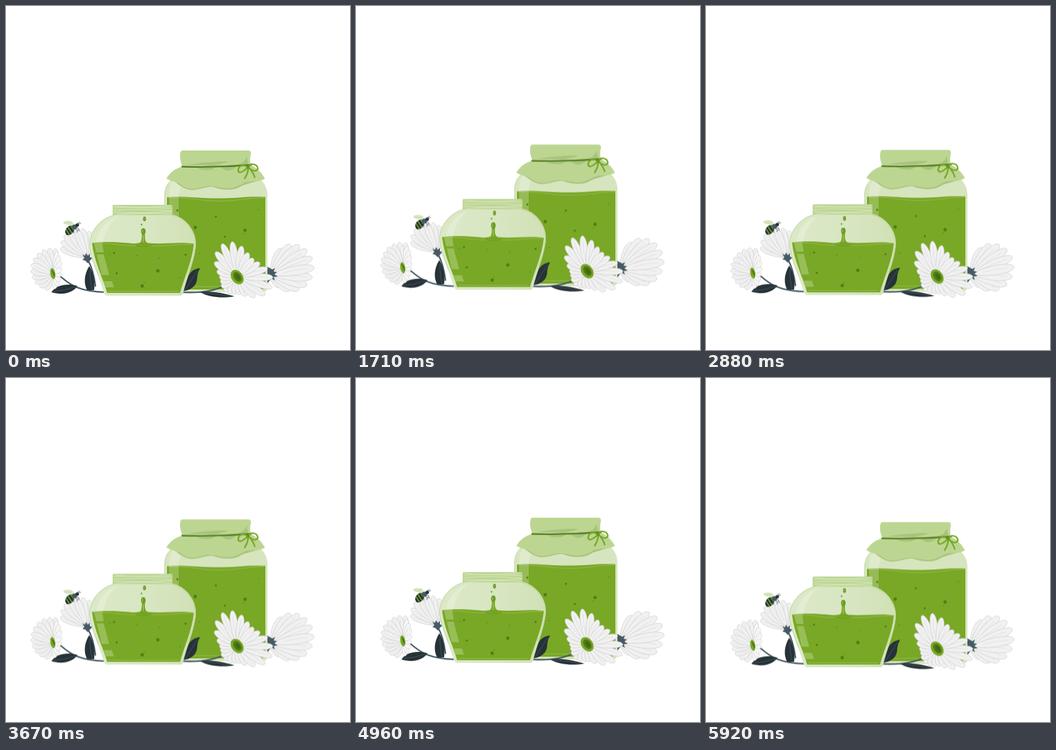
Animation, 500 px wide and 500 px high, one loop 5960 ms. Source, as an HTML page:

```html
<!DOCTYPE html>
<html lang="en">
<head>
<meta charset="utf-8">
<title>Jam jars</title>
<style>
html, body { margin: 0; width: 100%; height: 100%; overflow: hidden; background: #fff; }
svg { display: block; width: 100%; height: 100%; }
#scene { animation: float 5.96s linear infinite; }
/* a 3 s bob, cut slightly short on its second pass */
@keyframes float {
  0%, 50.336% { transform: translateY(0); }
  25.168%, 75.503% { transform: translateY(-10px); }
  100% { transform: translateY(-.267px); }
}
.glass { fill: #d7e5bf; }
.cloth { fill: #bcd692; }
.fold { fill: #a8c37d; }
.jam { fill: #78a825; }
.dark { fill: #507b17; }
.shine { fill: #fff; opacity: .22; }
.pane { fill: #a3c66a; opacity: .75; }
.leaf { fill: #263238; }
.calyx { fill: #455a64; }
.line { fill: none; stroke-linecap: round; stroke-linejoin: round; }
.stem { stroke: #455a64; stroke-width: 2.2; }
.rib { stroke: #607078; stroke-width: .5; }
.bow { stroke: #78a825; stroke-width: 2.3; }
.surface { stroke: #94bb53; }
.seed { stroke: #507b17; stroke-width: 4.8; }
.seed.small { stroke-width: 3; }
.seed.tiny { stroke-width: 1.5; }
.petal { fill: #f1f1f1; stroke: #c9c9c9; stroke-width: .6; }
.inner .petal { fill: #fafafa; }
.vein { stroke: #d6d6d6; stroke-width: .5; }
</style>
</head>
<body>
<svg viewBox="0 0 500 500">
<defs>
  <linearGradient id="sheen">
    <stop offset="0" stop-color="#dce9c8"/>
    <stop offset=".55" stop-color="#d8e6c2"/>
    <stop offset="1" stop-color="#d1e1b5"/>
  </linearGradient>
  <clipPath id="abdomen"><ellipse cx="92.500" cy="326" rx="7.800" ry="5.500" transform="rotate(-52 92.500 326)"/></clipPath>
</defs>
<g id="scene">
  <!-- large jar -->
  <path class="glass" d="M247 248H363C374 253 380 263 380 276V408Q380 416 372 416H238Q230 416 230 408V276C230 263 236 253 247 248Z"/>
  <path class="line" d="M235 259Q230.500 266 230.500 278V300" stroke="#c3d7a1" stroke-width=".8"/>
  <path class="jam" d="M234 278C252 276 275 279 300 279.500C335 280 350 276 377 277.500V405Q377 412 371 412H240Q234 412 234 405Z"/>
  <path class="line surface" d="M236 279C262 277 280 283 306 283.500C334 284 350 279 375 278.500"/>
  <path class="shine" d="M242 254Q251 253 257 259Q251 267 251 280V340H237V277Q237 262 242 254Z"/>
  <path class="line surface" d="M241 408H370"/>
  <path class="line seed" d="M275 322h0M347.500 326h0"/>
  <path class="line seed small" d="M305 306h0M318 335.300h0M249 297h0"/>
  <path class="line seed tiny" d="M345 331h0M367 296.300h0M281 359.500h0"/>

  <!-- cloth cover -->
  <path class="fold" d="M238 252C248 255 256 267 270 267.500C284 267 290 262 301 263C314 268 330 268 338 264C347 258 360 257 371 252Z"/>
  <path class="cloth" d="M257 233C247 236 239 241 233 250.500C240 256 248 254 256 261C264 267 274 267 286 263C300 259 310 265 322 265C334 265 338 261 346 257C358 253 366 257 376.500 251C371 241 363 234 355 231Z"/>
  <path class="cloth" d="M257 210H352Q356.500 210 356 215C354.500 221 354.500 226 356 232H256C253 225 252.500 219 253.500 213Q254 210 257 210Z"/>
  <path class="fold" d="M264 231C281 228 301 225.500 323 226C318 229 309 230 303 231.500ZM336 231Q347 228 350 219Q351 227 353 231ZM275 234H305Q300 239 291 238.500Q281 238 275 234ZM311 233H335Q329 240 321 239Q316 238 311 233Z"/>
  <path class="line" d="M256 233.500Q306 235 356 231" stroke="#557f20" stroke-width="2.3"/>
  <path class="line bow" d="M351 234C342 228 337 235 337.500 240C340 245 348 238 352 234C356 227 366 230 366 237C363 242 356 239 352 234M352 235Q352 243 347 250.500M353 235Q359 241 361.500 249"/>
  <circle cx="352" cy="234" r="2.4" fill="#69951f"/>

  <!-- left flowers and foliage -->
  <path class="line stem" d="M79 393C94 406 106 415 146 416M119 369Q127 383 130 407"/>
  <path class="leaf" d="M66 416C74 405 88 403 104 407C97 417 82 421 66 416ZM121 378C113 391 113 404 118 413H128C130 400 127 387 121 378Z"/>
  <path class="line rib" d="M69 415Q85 414 101 408M122 384Q122 400 125 412"/>
  <g id="back-left"></g>
  <path class="calyx" d="M111 361L115 363L116 359L119 363L122 360L122 365L126 366L122 370L119 374L115 370L111 369L114 366Z"/>
  <g id="left"></g>
  <g id="left-inner" class="inner"></g>
  <ellipse cx="68" cy="389" rx="3.600" ry="8" transform="rotate(-10 68 389)" class="jam"/>
  <path class="dark" d="M66 383Q72 386 71 394Q68 392 66 383Z"/>

  <!-- bee -->
  <path d="M98 318C93 311 86 311 83 315C87 319 94 319 98 318ZM99 317C96 311 91 312 90 314Z" fill="#d3e3b9"/>
  <g clip-path="url(#abdomen)">
    <path class="leaf" d="M82 315H104V337H82Z"/>
    <path class="line" d="M86 323L94 335M89 320L97 332M93 318L101 329" stroke="#78a825" stroke-width="1.500"/>
  </g>
  <circle class="calyx" cx="99.500" cy="321" r="3.600"/>
  <circle class="leaf" cx="103.500" cy="318.500" r="2.500"/>
  <path class="line" d="M99 324L98 330M101 324L104 326L103 329M103 322L106 324V327M104 316L107 314M105 317L108.500 316" stroke="#263238" stroke-width=".7"/>

  <!-- right flower and foliage -->
  <path class="line stem" d="M250 416C273 417 294 417 315 408"/>
  <path class="leaf" d="M282 381C267 383 263 394 261 405L256 415C274 412 278 403 278 393Q279 386 282 381ZM282 416C296 414 315 417 332 422C316 425 296 424 282 416Z"/>
  <path class="line rib" d="M260 413Q268 401 278 385M287 417Q307 418 326 422"/>
  <g id="right"></g>
  <path class="calyx" d="M380 379L387 383L391 381L389 386L394 387L390 390L395 393L389 394L391 399L386 396L380 403Z"/>

  <!-- small jar -->
  <path d="M160 303H240C262 306 277 329 276 346C275 369 262 397 258 416Q257 421 253 421H147Q144 421 142 416C137 397 122 369 121 346C121 328 137 306 160 303Z" fill="url(#sheen)"/>
  <path class="line" d="M156 304.500C137 309 122 329 121.500 346C122 362 129 377 134 391M242 304.500C261 309 275 329 275.500 346C275 360 269 376 264 389" stroke="#bdd397" stroke-width=".8"/>
  <path class="jam" d="M125 344.500C143 342 160 343 178 344.500Q188 346 195 344C198 341 197 334 198 328H202C202 336 201 342 206 344.500C230 347 250 342 273 345.500C271 371 258 397 253 417H147C141 395 128 372 125 344.500Z"/>
  <path class="line surface" d="M127 345C150 343 165 349 188 348.500M212 348.500C235 350 252 345 271 346.500"/>
  <path class="line" d="M190 348Q200 352 211 347M195 345Q200 348 206 345" stroke="#669421" stroke-width=".7"/>
  <g fill="#6b9c21">
    <ellipse cx="199.600" cy="327.500" rx="3.300" ry="4.500"/>
    <circle cx="197" cy="317.600" r="1.200"/>
    <ellipse cx="201.300" cy="309.400" rx="2.200" ry="3.400"/>
  </g>
  <path class="line" d="M198.500 326V329M199.500 334V343M200.700 308V310" stroke="#a5c972" stroke-width=".9"/>
  <path class="shine" d="M163 306C146 311 134 325 131 344H141C144 329 151 314 163 306Z"/>
  <path class="pane" d="M128 344.500H140L142 358H131ZM132 361H142L150 391H139ZM142 400H154L157 409H145Z"/>
  <path class="line surface" d="M149 414.500H250"/>
  <path class="line seed" d="M220.700 385h0M198 407h0"/>
  <path class="line seed small" d="M157 359h0M161 388.500h0M261 361.500h0"/>
  <path class="line seed tiny" d="M150.500 361h0M190 362.500h0M223 366.700h0M201 402h0M253 395h0"/>
  <path class="cloth" d="M157 289H240Q242 289 242 291V304H155V291Q155 289 157 289Z"/>
  <path class="line" d="M157 293Q195 292 240 294M156 297Q199 294 241 298M157 300Q199 302 241 299M158 290.500Q185 295 239 290.500M161 303Q205 300 240 302.500" stroke="#dce9c7" stroke-width=".9"/>

  <!-- front flower -->
  <g id="front"></g>
  <g transform="rotate(-35 336 394)">
    <ellipse class="jam" cx="336" cy="394" rx="8.300" ry="11.500"/>
    <ellipse class="dark" cx="336.500" cy="394" rx="5.300" ry="8"/>
    <ellipse cx="337" cy="394.500" rx="2.500" ry="4.500" fill="#426812"/>
  </g>
</g>
</svg>
<script>
const { PI, cos, sin, hypot, atan2, abs } = Math;
const rad = deg => deg * PI / 180;

// outlines: each maps an angle in degrees to a petal tip
const oval = (cx, cy, rx, ry) => deg =>
  [cx + rx * cos(rad(deg)), cy + ry * sin(rad(deg))];

// tilted bloom with two long lobes either side of its axis
const lobed = (cx, cy, axis) => deg => {
  const a = rad(deg - axis);
  const r = 38 + 11 * cos(a) - 6 * cos(2 * a) - 7 * cos(3 * a);
  return [cx + r * cos(rad(deg)), cy + r * sin(rad(deg))];
};

function add(parent, tag, attrs) {
  const node = document.createElementNS('http://www.w3.org/2000/svg', tag);
  for (const key in attrs) node.setAttribute(key, attrs[key]);
  parent.append(node);
}

function addPetal(group, [bx, by], [tx, ty], w) {
  const len = hypot(tx - bx, ty - by);
  const angle = atan2(ty - by, tx - bx) * 180 / PI;
  const transform = `translate(${bx} ${by}) rotate(${angle})`;
  const near = len * .4, far = len * .98;
  add(group, 'path', {
    class: 'petal', transform,
    d: `M0 0C${near} ${-w} ${far} ${-w} ${len} 0C${far} ${w} ${near} ${w} 0 0Z`
  });
  add(group, 'path', {
    class: 'line vein', transform,
    d: `M${len * .3} 0Q${len * .55} ${-w * .25} ${len * .85} 0`
  });
}

// petals spread evenly over an arc, the outer ones behind
function fan(id, base, outline, from, to, count, width) {
  const group = document.getElementById(id);
  const mid = (from + to) / 2;
  const angles = Array.from({ length: count }, (_, i) => from + (to - from) * i / (count - 1));
  angles.sort((a, b) => abs(b - mid) - abs(a - mid));
  for (const deg of angles) addPetal(group, base, outline(deg), width);
}

fan('back-left', [118, 366], oval(106, 350, 27, 27), 175, 325, 8, 7);
fan('left', [69, 390], oval(66, 383, 30, 31), 105, 282, 11, 6.5);
fan('left-inner', [69, 389], oval(68, 383, 13, 29), -62, 75, 8, 4.5);
fan('right', [384, 391], oval(418, 380, 30, 34), -125, 125, 11, 9);
fan('front', [336, 394], lobed(336, 394, -49), -229, 115, 22, 7);
</script>
</body>
</html>
```
